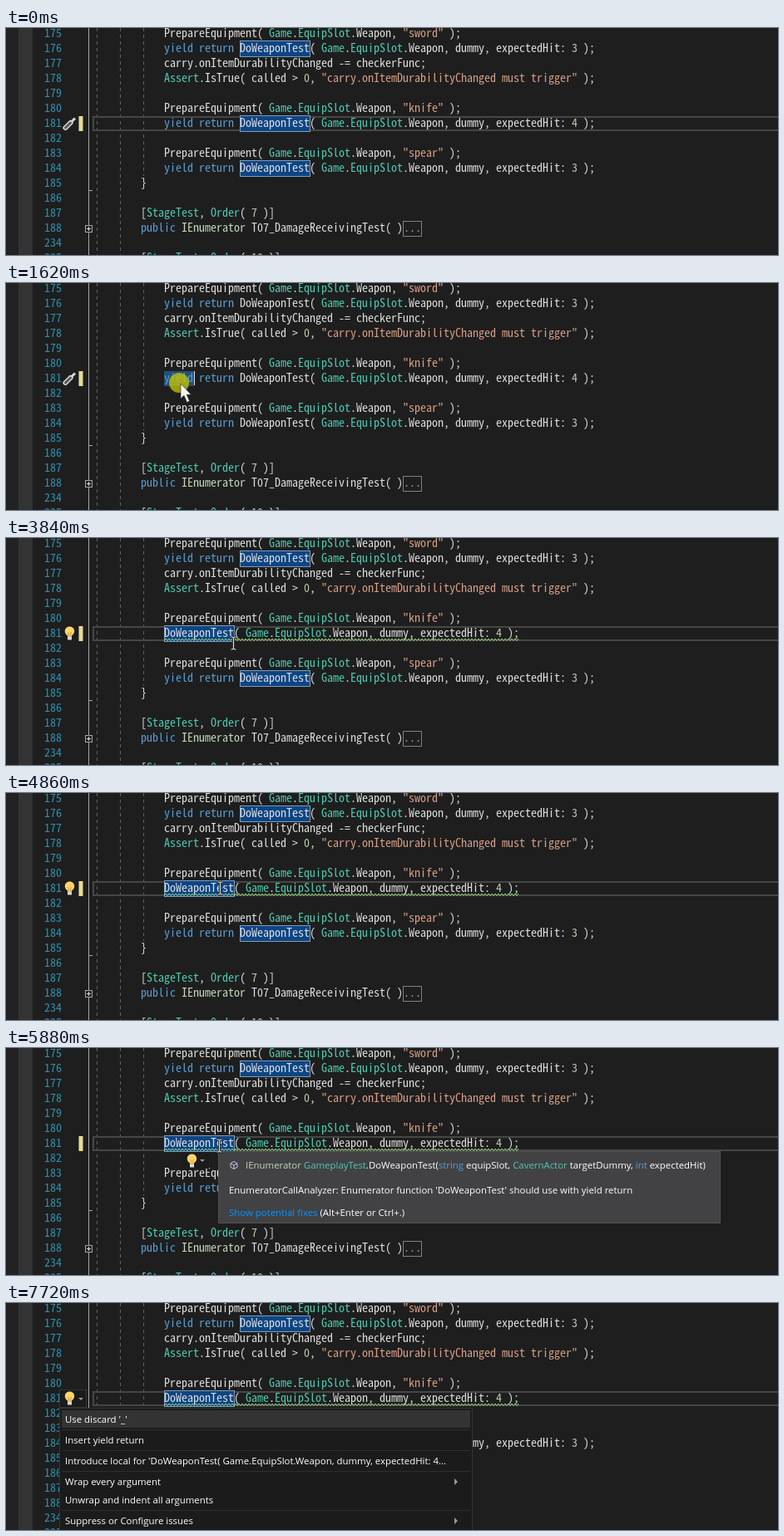
Recreate the animation shown at these times as an HTML page. Size 928x273 px, loop 8000 ms.

```html
<!DOCTYPE html>
<html lang="en">
<head>
<meta charset="utf-8">
<title>Code editor: missing yield return</title>
<style>
  html, body { margin: 0; width: 100%; height: 100%; overflow: hidden; background: #1e1e1e; }
  svg { display: block; width: 928px; height: 273px; }
  text { white-space: pre; }
  .code { font-family: "Noto Sans Mono CJK JP", "Noto Sans Mono CJK SC", "Noto Sans Mono", monospace; }
  .ui { font: 11.42px "Open Sans", "Noto Sans", sans-serif; fill: #fff; }
</style>
</head>
<body>
<svg id="stage" viewBox="0 0 928 273" xmlns="http://www.w3.org/2000/svg"></svg>
<script>
const LOOP = 8000, STEP = 202.5, CHAR = 7, ROW = 18, LEFT = 190;
const stage = document.getElementById('stage');
const C = {
  plain: '#dcdcdc', key: '#569cd6', type: '#4ec9b0', face: '#c4d6b8',
  str: '#d69d85', num: '#b5cea8', line: '#2b91af'
};

function add(parent, tag, attrs = {}, text) {
  const node = document.createElementNS('http://www.w3.org/2000/svg', tag);
  for (const k in attrs) node.setAttribute(k, attrs[k]);
  if (text !== undefined) node.textContent = text;
  parent.appendChild(node);
  return node;
}
const group = (parent = stage, attrs) => add(parent, 'g', attrs);
const box = (parent, x, y, width, height, fill, more) =>
  add(parent, 'rect', { x, y, width, height, fill, ...more });
const path = (parent, d, stroke, more) => add(parent, 'path', { d, stroke, fill: 'none', ...more });
const show = (node, on) => node.setAttribute('visibility', on ? 'visible' : 'hidden');
const move = (node, x, y) => node.setAttribute('transform', `translate(${x} ${y})`);
const baseline = row => 11 + row * ROW;

// Pick the size that gives one character cell of 7px.
const probe = document.createElement('canvas').getContext('2d');
probe.font = '14px "Noto Sans Mono CJK JP", "Noto Sans Mono CJK SC", "Noto Sans Mono", monospace';
const codeSize = 14 * CHAR / probe.measureText('M').width;

function word(parent, x, y, text, fill) {
  add(parent, 'text', { x, y, fill, class: 'code', 'font-size': codeSize }, text);
}

function colorOf(s) {
  if (s[0] === '"') return C.str;
  if (/^(yield|return|public)$/.test(s)) return C.key;
  if (/^(Game|EquipSlot|Assert|StageTest|Order)$/.test(s)) return C.type;
  if (s === 'IEnumerator') return C.face;
  return /^\d/.test(s) ? C.num : C.plain;
}

function code(parent, x, y, text) {
  for (const m of text.matchAll(/"[^"]*"|\w+|[^\w\s"]+/g))
    word(parent, x + m.index * CHAR, y, m[0], colorOf(m[0]));
}

function label(parent, x, y, parts) {
  const t = add(parent, 'text', { x, y, class: 'ui' });
  for (const [s, fill] of parts) add(t, 'tspan', fill ? { fill } : {}, s);
}

function bulb(parent, x, y) {
  const g = group(parent, { transform: `translate(${x} ${y})` });
  add(g, 'path', { d: 'M-2.5 7V5.5C-8 2-6-5.5 0-5.5S8 2 2.5 5.5V7Z', fill: '#ffd56a' });
  path(g, 'M-1.2 7V2.5L-2.2 1M1.2 7V2.5L2.2 1', '#a8842f', { 'stroke-width': .7 });
  box(g, -2.5, 7, 5, 3.5, '#d8d8d8');
}
const downArrow = (parent, x, y) =>
  add(parent, 'path', { d: `M${x - 3} ${y}h6l-3 3z`, fill: '#999' });

// Gutter and guides
box(stage, 0, 0, 928, 273, '#1e1e1e');
box(stage, 0, 0, 15, 273, '#222224');
box(stage, 15, 0, 17, 273, '#333333');
box(stage, 99, 0, 1, 273, '#a5a5a5');
box(stage, 99, 195, 5, 1, '#a5a5a5');
box(stage, 95.5, 237.5, 8, 8, '#1e1e1e', { stroke: '#a5a5a5' });
path(stage, 'M97 241.5H102M99.5 239V244', '#dcdcdc');
for (const [x, end] of [[109.5, 273], [137.5, 273], [165.5, 178]])
  path(stage, `M${x} 0V${end}`, '#606060', { 'stroke-dasharray': '4 4' });
box(stage, 87.5, 106, 5, 18, '#e5dc98');

const current = box(stage, 105, 107, 840, 16, 'none', { stroke: '#464646', 'stroke-width': 2 });

// Reference highlights
const mark = (parent, x, row) =>
  box(parent, x + .5, baseline(row) - 13.5, 12 * CHAR, 19, '#0e4583', { stroke: '#7f9bb8', 'stroke-width': 1 });
const marks = group();
mark(marks, 281, 1);
mark(marks, 281, 9);
const ownMark = mark(marks, 0, 6);
const selection = box(stage, LEFT, 106, 36, 18, '#264f78');

// Code
const call = n => `DoWeaponTest( Game.EquipSlot.Weapon, dummy, expectedHit: ${n} );`;
const equip = item => `PrepareEquipment( Game.EquipSlot.Weapon, "${item}" );`;
const rows = [
  [12, equip('sword')],
  [12, 'yield return ' + call(3)],
  [12, 'carry.onItemDurabilityChanged -= checkerFunc;'],
  [12, 'Assert.IsTrue( called > 0, "carry.onItemDurabilityChanged must trigger" );'],
  [0, ''],
  [12, equip('knife')],
  [0, ''],
  [0, ''],
  [12, equip('spear')],
  [12, 'yield return ' + call(3)],
  [8, '}'],
  [0, ''],
  [8, '[StageTest, Order( 7 )]'],
  [8, 'public IEnumerator T07_DamageReceivingTest( )'],
  [0, ''],
  [8, '[StageTest, Order( 10 )]']
];
rows.forEach(([indent, text], i) => {
  word(stage, 46, baseline(i), String(i < 14 ? 175 + i : 220 + i), C.line);
  code(stage, 106 + indent * CHAR, baseline(i), text);
});
box(stage, 477.5, 232.5, 22, 18, 'none', { stroke: '#808080' });
word(stage, 478, baseline(13), '...', '#a0a0a0');

const keywords = group();
code(keywords, LEFT, baseline(6), 'yield return');
const tail = group();
code(tail, 0, baseline(6), call(4));

let wave = 'M190 123.5';
for (let x = 192; x <= 617; x += 2) wave += `L${x} ${x % 4 ? 123.5 : 121}`;
const squiggle = path(stage, wave, '#95db7d', { 'stroke-width': 1 });
const caret = box(stage, LEFT, 106, 1, 17, '#dcdcdc');

// Margin icons
const tool = group();
path(tool, 'M83 108.5L77 114.5', '#d8d8d8', { 'stroke-width': 3 });
path(tool, 'M77.5 114L71.5 120', '#d8d8d8', { 'stroke-width': 6, 'stroke-linecap': 'round' });
path(tool, 'M77.5 114L71.5 120', '#55585c', { 'stroke-width': 3, 'stroke-linecap': 'round' });
const marginBulb = group();
bulb(marginBulb, 76.5, 112);

// Inline bulb and tooltip
const inlineBulb = group();
box(inlineBulb, 212, 125, 32, 20, '#1b1b1c');
bulb(inlineBulb, 223.5, 133);
downArrow(inlineBulb, 236, 134);

const tip = group();
const tipBox = box(tip, 255.5, 124.5, 603, 65, '#424245', { stroke: '#515154' });
path(tip, 'M274 136.5L278 138.7V143.3L274 145.5L270 143.3V138.7ZM270 138.7L274 141L278 138.7M274 141V145.5', '#cdbbe4');
label(tip, 288, 145, [
  ['IEnumerator ', C.face], ['GameplayTest', C.type], ['.DoWeaponTest('],
  ['string', C.key], [' equipSlot, '], ['CavernActor', C.type],
  [' targetDummy, '], ['int', C.key], [' expectedHit)']
]);
label(tip, 268, 175, [["EnumeratorCallAnalyzer: Enumerator function 'DoWeaponTest' should use with yield return"]]);
const fixes = group(tip);
label(fixes, 268, 202, [['Show potential fixes', '#0097fb'], [' (Alt+Enter or Ctrl+.)']]);

// Quick action menu
const menu = group();
box(menu, 64.5, 104.5, 32, 21, '#1b1b1c', { stroke: '#333337' });
bulb(menu, 76.5, 112);
downArrow(menu, 90, 114);
box(menu, 64.5, 126.5, 496, 160, '#1b1b1c', { stroke: '#333337' });
box(menu, 67, 129, 491, 21, '#333334');
for (const y of [152, 177, 202, 249]) box(menu, 67, y, 491, 1, '#2d2d30');
[
  [144, "Use discard '_'"],
  [169, 'Insert yield return'],
  [194, "Introduce local for 'DoWeaponTest( Game.EquipSlot.Weapon, dummy, expectedHit: 4..."],
  [219, 'Wrap every argument', 1],
  [241, 'Unwrap and indent all arguments'],
  [266, 'Suppress or Configure issues', 1]
].forEach(([y, text, sub]) => {
  label(menu, 71, y, [[text]]);
  if (sub) add(menu, 'path', { d: `M539 ${y - 8}v8l4-4z`, fill: '#999' });
});

// Pointer
const press = add(stage, 'circle', { r: 12, fill: '#c8c800', opacity: .75 });
const arrow = add(stage, 'path', { d: 'M0 0V18L4 14.3L7.5 22.5L10.7 21L7.2 13.2H12.5Z', fill: '#f4f4f4', stroke: '#222', 'stroke-width': .6 });
const beam = group();
for (const [color, w] of [['#1e1e1e', 3], ['#dcdcdc', 1.2]])
  path(beam, 'M-3-7.5H-1.5L0-6.5L1.5-7.5H3M0-6.5V6.5M-3 7.5H-1.5L0 6.5L1.5 7.5H3', color, { 'stroke-width': w });

// time, x, y, shape
const pointer = [
  [0, 0, 0, 'none'],
  [200, 449, 221, 'beam'], [400, 400, 188, 'beam'], [600, 330, 154, 'beam'],
  [805, 272, 131, 'beam'], [1010, 239, 121, 'beam'], [1210, 225, 119, 'beam'],
  [1410, 209, 121, 'press'], [1820, 228, 122, 'press'], [2020, 247, 123, 'press'],
  [2220, 253, 124, 'beam'],
  [3240, 264, 154, 'beam'], [3440, 274, 180, 'beam'], [3640, 277, 150, 'beam'],
  [3840, 273, 126, 'beam'], [4050, 262, 118, 'beam'], [4250, 257, 114, 'beam'],
  [5880, 256, 117, 'beam'], [7720, 0, 0, 'none']
];

function render(t) {
  const [, px, py, shape] = pointer.filter(p => p[0] <= t).pop();
  show(beam, shape === 'beam');
  show(arrow, shape === 'press');
  show(press, shape === 'press');
  move(beam, px + .5, py + .5);
  move(arrow, px + 1, py);
  move(press, px - 1, py - 1);

  const selecting = t >= 1410 && t < 2630;
  const selected = t < 1820 ? 36 : t < 2020 ? 56 : 84;
  const cut = t >= 2630;
  const lit = t < 1410 || t >= 3240;
  show(selection, selecting);
  selection.setAttribute('width', selected);
  show(current, !selecting);
  show(keywords, !cut);
  show(tool, !cut);
  const tailX = !cut ? LEFT + 13 * CHAR : t < 2830 ? LEFT + CHAR : LEFT;
  move(tail, tailX, 0);
  show(marks, lit);
  ownMark.setAttribute('x', tailX + .5);

  const tick = Math.floor((t + 8) / STEP) * STEP;
  const blink = t < 2830 || Math.floor((tick - 2830) / 520) % 2 === 0;
  show(caret, t >= 1410 && blink);
  caret.setAttribute('x', LEFT + (selecting ? selected : 0));

  const open = t >= 7720;
  show(squiggle, t >= 3440);
  show(marginBulb, t >= 3640 && t < 5270);
  show(tip, t >= 5060 && !open);
  show(fixes, t >= 5270 && !open);
  tipBox.setAttribute('height', t < 5270 ? 65 : 86);
  show(inlineBulb, t >= 5270 && !open);
  show(menu, open);
}

const start = performance.now();
function frame() {
  render((performance.now() - start) % LOOP);
  requestAnimationFrame(frame);
}
frame();
</script>
</body>
</html>
```
